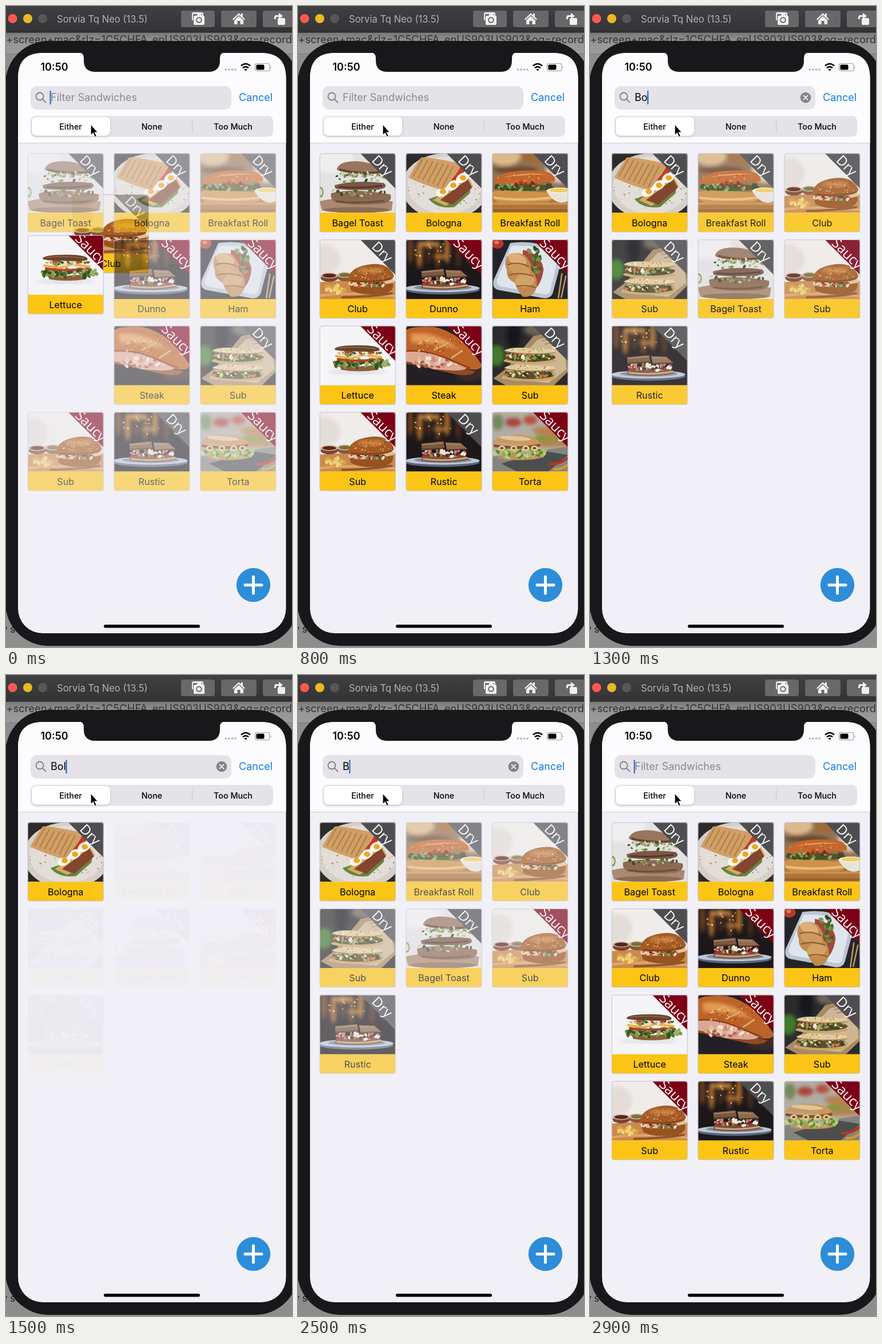
Animation, 500 px wide and 1120 px high, one loop 3 s. Source, as an HTML page:

```html
<!DOCTYPE html>
<html lang="en">
<head>
<meta charset="utf-8">
<title>Sandwich filter</title>
<style>
  html, body { margin: 0; width: 100%; height: 100%; overflow: hidden; background: #8d8d8e; }
  svg { display: block; width: 100%; height: 100%; font-family: Inter, Roboto, sans-serif; }
  .mid { text-anchor: middle; }
  .ribbon { font: 24px "Open Sans", "Noto Sans", sans-serif; fill: #fff; text-anchor: middle; }
  .segment { font-size: 14.3px; font-weight: 500; text-anchor: middle; }
</style>
</head>
<body>
<svg viewBox="0 0 500 1120" preserveAspectRatio="none">
  <defs>
    <linearGradient id="bar" x2="0" y2="1"><stop stop-color="#404043"/><stop offset="1" stop-color="#333336"/></linearGradient>
    <linearGradient id="page" x2="0" y2="1"><stop stop-color="#777778"/><stop offset=".5" stop-color="#979798"/><stop offset="1" stop-color="#9b9b9c"/></linearGradient>
    <clipPath id="cardClip"><rect width="133" height="138" rx="4"/></clipPath>
    <clipPath id="photoClip"><rect width="133" height="104"/></clipPath>
    <filter id="soft"><feGaussianBlur stdDeviation=".7"/></filter>
    <filter id="haze"><feGaussianBlur stdDeviation="3"/></filter>
    <filter id="lift" x="-10%" y="-20%" width="120%" height="150%"><feDropShadow dx="0" dy="2" stdDeviation="2" flood-opacity=".16"/></filter>
  </defs>

  <!-- window behind the phone -->
  <rect width="500" height="1120" fill="#8d8d8e"/>
  <rect y="46" width="500" height="38" fill="url(#page)"/>
  <path d="M0 83.5H500" stroke="#777"/>
  <text x="500" y="65" text-anchor="end" font-size="18.4" fill="#343436">l+screen+mac&amp;rlz=1C5CHFA_enUS903US903&amp;oq=record</text>
  <text x="-7" y="1095" font-size="17" fill="#222">y s</text>
  <rect width="500" height="46" fill="url(#bar)"/>
  <path d="M0 46H500" stroke="#1f1f20"/>
  <circle cx="11.5" cy="22" r="8" fill="#f9584f"/>
  <circle cx="38" cy="22" r="8" fill="#e8b928"/>
  <circle cx="64" cy="22" r="8" fill="#57575a"/>
  <text x="89" y="28.5" font-size="16.6" fill="#b3b3b6">Sorvia Tq Neo (13.5)</text>
  <g fill="#68686b">
    <rect x="306" y="8" width="59" height="29" rx="4"/>
    <rect x="376" y="8" width="62" height="29" rx="4"/>
    <rect x="449" y="8" width="60" height="29" rx="4"/>
  </g>
  <g fill="#f0f0f1">
    <path d="M325 14q0-3 3-3h14q3 0 3 3v3h-2v-3h-16v11h-2z"/>
    <path d="M328 19q0-2 2-2h3l2-3h6l2 3h2q2 0 2 2v12q0 2-2 2h-15q-2 0-2-2z"/>
    <path d="M396 23 407 12.500 411 16v-3h3v6l4 4-1.500 1.500L407 15.800 397.500 24.500z"/>
    <path d="M399 25 407 17.500 415 25v7h-5.500v-6h-5v6H399z"/>
    <rect x="475" y="21" width="13" height="12" rx="2"/>
    <path d="M469 23v-3q0-4 4-4h4v-4l7 5.500-7 5.500v-4h-3q-2 0-2 2v2z"/>
  </g>
  <circle cx="337.500" cy="24.500" r="4.300" fill="none" stroke="#68686b" stroke-width="2"/>

  <!-- phone, centred on x = 255 and running off the right edge -->
  <rect x="-1" y="61" width="512" height="1057" rx="75" fill="#18171a"/>
  <rect x="21" y="82" width="468.500" height="1014" rx="43" fill="#f1f0f7"/>
  <path d="M21 240V125Q21 82 64 82H446.500Q489.500 82 489.500 125V240z" fill="#fcfbfe"/>
  <path d="M21 239.500H489.500" stroke="#cdccd2"/>
  <path d="M126 81Q136 81 136 91V95Q136 115 156 115H354Q374 115 374 95V91Q374 81 384 81z" fill="#18171a"/>
  <text x="60.500" y="113.300" font-size="18" font-weight="600">10:50</text>
  <g fill="#bdbcc2"><circle cx="384.500" cy="111" r="2"/><circle cx="390" cy="111" r="2"/><circle cx="395.500" cy="111" r="2"/><circle cx="401" cy="111" r="2"/></g>
  <g fill="none" stroke="#000" stroke-width="2.600"><path d="M411 104.500q8-7 16 0M414 108.300q5-4.300 10 0"/></g>
  <path d="M416.300 110.700q2.700-2 5.400 0L419 113.500z"/>
  <rect x="435.500" y="100.500" width="25.500" height="13" rx="3.500" fill="none" stroke="#9b9a9f" stroke-width="1.200"/>
  <path d="M462.800 105v4.500q2-2.200 0-4.500" fill="#9b9a9f"/>
  <rect x="437.500" y="102.500" width="14" height="9" rx="1.800"/>

  <!-- search -->
  <rect x="43" y="140" width="351" height="41" rx="11" fill="#e5e3e8"/>
  <g fill="none" stroke="#7f7e84" stroke-width="1.800"><circle cx="59" cy="158" r="6.500"/><path d="M63.700 162.700 69.500 168.500" stroke-linecap="round"/></g>
  <text id="hint" x="78" y="166.300" font-size="18" fill="#8a898f">Filter Sandwiches</text>
  <text id="query" x="78" y="166.300" font-size="18"></text>
  <rect id="caret" y="148" width="2.200" height="24" fill="#2a6cc6"/>
  <g id="clear"><circle cx="377" cy="160" r="9.300" fill="#838287"/><path d="M373.500 156.500l7 7m0-7l-7 7" stroke="#f1f0f4" stroke-width="1.800" stroke-linecap="round"/></g>
  <text x="407" y="166.300" font-size="18" fill="#107adb">Cancel</text>
  <rect x="43" y="192" width="424" height="36.500" rx="9" fill="#e5e3e8"/>
  <rect x="45" y="194" width="137" height="32.500" rx="8" fill="#fff" filter="url(#lift)"/>
  <path d="M325.500 200V220" stroke="#c9c8ce"/>
  <text class="segment" x="113" y="215.500">Either</text>
  <text class="segment" x="255" y="215.500">None</text>
  <text class="segment" x="397" y="215.500">Too Much</text>

  <g id="cards"></g>

  <path d="M148 206.500V226L152.300 222 155.300 229 158.500 227.600 155.500 221H161z" stroke="#fff" stroke-width="1.300"/>
  <circle cx="432.500" cy="1011.700" r="29.600" fill="#2d8dd8"/>
  <path d="M418 1011.700h29M432.500 997.200v29" stroke="#fff" stroke-width="5" stroke-linecap="round"/>
  <rect x="171" y="1081" width="168" height="5.500" rx="2.700"/>
</svg>

<script>
const $ = id => document.getElementById(id);

// Drawing helpers, each returning SVG markup
const oval = (x, y, rx, ry, fill, turn = 0) =>
  `<ellipse cx="${x}" cy="${y}" rx="${rx}" ry="${ry}" fill="${fill}" transform="rotate(${turn} ${x} ${y})"/>`;
const area = (d, fill) => `<path d="${d}" fill="${fill}"/>`;
const line = (d, color, width) =>
  `<path d="${d}" fill="none" stroke="${color}" stroke-width="${width}" stroke-linecap="round"/>`;
const back = fill => `<rect x="-6" y="-6" width="145" height="116" fill="${fill}"/>`;
const hazy = body => `<g filter="url(#haze)">${body}</g>`;

// Random crumbs and leaves inside an ellipse
function bits(n, x, y, rx, ry, size, colors) {
  let seed = n * 31 + x * 7 + y;
  const rnd = () => (seed = (seed * 16807 + 11) % 2147483647) / 2147483647;
  for (let i = 0; i < 5; i++) rnd();
  let out = '';
  for (let i = 0; i < n; i++) {
    const a = rnd() * 6.283, r = Math.sqrt(rnd()), s = size * (.6 + rnd() * .7);
    out += oval((x + Math.cos(a) * r * rx).toFixed(1), (y + Math.sin(a) * r * ry).toFixed(1),
      s.toFixed(1), (s * .6).toFixed(1), colors[i % colors.length], Math.round(rnd() * 180));
  }
  return out;
}

const leaf = ['#4c6b2c', '#7f9a4c', '#34501f', '#a3b070'];

const photos = {
  bagel: () => back('#e4e2e3') + hazy(oval(20, 10, 40, 25, '#efedee')) +
    oval(2, 68, 5, 9, '#7e9a55') + oval(2, 68, 3, 6, '#d5dfbd') +
    area('M0 84Q30 76 65 79T128 84L126 100Q65 110 4 100z', '#a98a70') +
    oval(65, 99, 58, 5, '#8b6c55') +
    area('M20 70Q60 60 124 72 128 84 112 88 64 92 28 86 18 80 20 70', '#8a6a52') +
    line('M30 84Q70 89 112 83', '#6d4f3c', 3) +
    bits(40, 68, 66, 50, 9, 3, [...leaf, '#c9cbaa', '#6b4a38']) +
    area('M26 56Q60 46 112 52 122 60 104 63 60 66 28 62z', '#7b5744') +
    line('M34 59Q70 62 108 57', '#54382c', 3) +
    bits(44, 70, 42, 48, 10, 3, [...leaf, '#d2d3b6', '#b9bd8c']) +
    area('M30 28Q34 14 62 14T110 30Q106 38 68 35T30 28', '#98765e') +
    line('M36 29Q68 37 106 33', '#6b4132', 4) +
    bits(22, 74, 37, 42, 4, 2.5, ['#5d7a37', '#87a256', '#dadcc2']),

  bologna: () => back('#2d2a29') + oval(69, 58, 76, 58, '#d4cfc8') + oval(69, 56, 66, 50, '#e2ddd6') +
    bits(44, 68, 62, 64, 40, 1.2, ['#8b5f4a', '#b0968a']) +
    area('M40 80Q55 98 85 94L112 70 114 50 70 70z', '#66853f') +
    area('M48 82 70 92 118 58 108 40z', '#d9ab60') + area('M60 82 82 90 116 60 108 45z', '#84452f') +
    line('M66 62Q88 50 100 25', '#c43a24', 10) + line('M70 67Q92 55 106 38', '#d9573c', 4) +
    [[64, 67], [82, 56], [99, 43]].map(([x, y]) =>
      oval(x, y, 12, 8, '#fbf9f3', -30) + oval(x + 1, y, 5.5, 4.5, '#f1a51f')).join('') +
    area('M5 43Q6 38 26 8 30 4 95 18 100 22 68 62 62 68 5 43', '#cf9f66') +
    [0, 1, 2, 3, 4, 5, 6].map(i =>
      line(`M${29 + i * 9} ${11 + i * 2}L${13 + i * 8.5} ${40 + i * 3.2}`, '#b07c48', 2)).join(''),

  breakfast: () => back('#8f7357') + hazy(oval(22, 6, 28, 16, '#dcb98a') + oval(72, 4, 22, 15, '#a06a38') +
    oval(116, 30, 22, 22, '#d9cbb8') + oval(40, 29, 40, 6, '#6b4a2f')) +
    area('M0 76H133V104H0z', '#b0743a') + line('M-2 88H135', '#cb924f', 4) + line('M-2 100H135', '#95602e', 4) +
    area('M0 68Q10 62 60 66T108 68Q112 82 96 85L12 86Q0 82 0 68', '#cf9248') +
    line('M4 78Q50 84 102 78', '#e8bd7d', 4) + oval(56, 60, 52, 6, '#3f5a22') +
    bits(46, 55, 58, 52, 7, 3.5, [...leaf, '#a92e22', '#2f4a1c']) +
    area('M3 54Q0 44 20 36T90 31Q112 36 110 49 60 52 3 54', '#c4672c') +
    area('M20 42Q55 32 98 37 56 38 20 42', '#e2975a') + bits(22, 56, 43, 46, 6, 1.2, ['#efc48d', '#984717']) +
    bits(10, 70, 54, 38, 3, 4, ['#c22d20', '#742c23']) +
    area('M94 65H139V80Q114 98 94 65', '#e8e4dc') + oval(117, 65, 21, 5, '#f4f1ea') + oval(117, 65, 17, 3.500, '#f1ce58'),

  club: () => back('#f0ece9') + hazy(oval(8, 35, 28, 26, '#e4dcd7')) +
    area('M-5 75Q65 68 138 73V110H-5z', '#cb8a4d') + line('M0 98Q60 91 133 99', '#dfa669', 4) +
    line('M40 101Q90 100 126 94', '#8d5529', 4) +
    oval(17, 67, 15, 7, '#7c4430') + oval(17, 63, 15, 5, '#c8b19b') + oval(17, 63, 12, 3.500, '#5d2418') +
    oval(44, 66, 13, 7, '#8b5738') + oval(44, 62, 13, 5, '#cbb89e') + oval(44, 62, 10, 3.500, '#77703a') +
    oval(29, 88, 18, 6, '#d7a94e') + bits(22, 28, 86, 18, 8, 4, ['#efcc73', '#d8a043', '#f3da92']) +
    area('M52 78Q80 86 128 75 132 90 112 95 72 99 55 89z', '#97531f') +
    line('M54 77Q82 83 127 72', '#dfc39b', 7) +
    bits(34, 88, 77, 36, 5, 3.5, ['#8c2c22', '#c6543c', '#6d8238', '#e9dbc3', '#5a2a18']) +
    area('M50 73Q49 50 84 44T130 63Q130 74 92 75T50 73', '#a45a22') +
    hazy(oval(90, 54, 24, 5, '#cf8744')) + line('M56 72Q92 76 126 68', '#7c3f16', 2) +
    bits(46, 91, 60, 33, 11, 1.2, ['#dba76d', '#7a3c14', '#e9c08a']),

  dunno: () => back('#1c181a') + hazy([8, 24, 40, 56, 72, 92, 112].map((x, i) =>
      oval(x, 18 + i % 2 * 8, 5, 24, ['#6b3f22', '#a8682c', '#472c1c'][i % 3])).join('') +
      oval(40, 8, 20, 4, '#c98d45') + oval(62, 30, 14, 3, '#b9793a')) +
    bits(16, 52, 24, 48, 18, 1.8, ['#f0b85e', '#d98e3c', '#ffe0a0']) +
    oval(64, 88, 65, 8, '#59667a') + oval(64, 85, 65, 7, '#bcc6d5') + oval(65, 84, 50, 5, '#7f8a9c') +
    area('M29 76 103 74 110 83Q70 91 27 85z', '#7a4e36') + line('M31 82Q68 87 107 80', '#c9a67e', 3) +
    bits(50, 67, 72, 40, 7, 3.5, ['#efe4d5', '#ad2d35', '#8a9949', '#d47b79', '#f5eee1', '#5b2a26']) +
    area('M27 55 66 51 68 64 28 67z', '#7a5840') + area('M69 53 96 54 108 65 72 67z', '#8f6b4e') +
    line('M29 57 64 54M72 56 94 57', '#a5835f', 2) + line('M29 65 67 63M73 66 105 65', '#54392a', 2),

  ham: () => back('#242428') + oval(9, 7, 11, 9, '#b8392a') + oval(8, 5, 4, 3, '#e47a57') +
    area('M32 6Q74 0 112 18 125 23 121 38L106 94Q101 105 87 102L10 88Q-1 84 3 70z', '#bcc5d1') +
    area('M34 11Q73 8 110 23 117 26 114 37L101 92Q96 98 87 95L15 82Q6 79 9 69z', '#dfe5ec') +
    area('M54 18Q86 25 90 52 86 84 66 92L52 65z', '#a3483a') +
    bits(40, 70, 40, 16, 26, 4, ['#40652c', '#6a8c3d', '#2b4820', '#7d9950']) +
    area('M26 30Q40 18 58 28 70 40 68 54 80 62 78 82 74 102 54 100 44 90 40 76 24 68 26 54 20 42 26 30', '#c08a52') +
    oval(44, 35, 17, 10, '#dcae78', 24) + oval(48, 52, 20, 10, '#cd9a60', 18) + oval(57, 72, 17, 11, '#d3a267', -8) +
    line('M28 44Q44 38 64 47M30 62Q48 56 72 64M44 82Q58 78 76 84', '#8d5a2c', 2) +
    line('M122 60 116 102M129 64 121 101', '#b99a60', 2.5),

  lettuce: () => back('#f5f5f8') + hazy(oval(66, 81, 52, 4, '#dcdfe6')) +
    area('M34 68Q64 74 106 67L102 77Q68 82 38 77z', '#8d6136') +
    bits(60, 70, 66, 50, 8, 4.5, leaf) + line('M32 58Q62 64 107 58', '#b8402c', 4) +
    line('M29 53 56 57 76 51 108 55', '#eab03c', 4) + line('M32 48Q70 53 105 48', '#e6b2a0', 3) +
    bits(30, 66, 48, 43, 4, 3.5, [...leaf, '#c94430', '#f0ddc0']) +
    area('M26 41Q29 34 67 34T105 42Q105 46 66 45T26 41', '#67432a') +
    line('M33 39Q65 35 98 40', '#8d6241', 2) + bits(20, 103, 68, 18, 8, 4.5, leaf),

  steak: () => back('#241f24') + hazy(oval(112, 84, 26, 12, '#3d2c2b')) +
    area('M0 54 40 58 90 72 122 80Q112 90 84 84L40 74 0 66z', '#8f4c22') +
    area('M0 42 40 44 112 70Q104 80 80 78L48 76 30 68 0 62z', '#dca896') +
    bits(40, 52, 63, 46, 10, 4, ['#f0ccb9', '#cf8a78', '#f7e4d4', '#a8604f', '#e7bba8']) +
    area('M0 8Q10 0 50 2 84 10 106 34T133 70Q128 80 108 75L62 54Q30 42 0 46z', '#bd6228') +
    hazy(area('M8 14Q54 8 98 44 56 28 10 30z', '#e39b54')) +
    line('M22 32 48 20M50 42 74 30M80 56 98 44', '#dfa762', 3) + line('M0 44Q34 42 64 54T112 74', '#7f3c17', 2) +
    bits(40, 61, 34, 50, 18, 1.4, ['#f0bf7e', '#8a411b']),

  panini: () => back('#2b2b2b') + hazy(oval(38, 17, 12, 24, '#12151b') + oval(8, 52, 14, 18, '#3f7a2c') +
      oval(80, 6, 24, 12, '#6b6255')) + area('M72 18 128 6 133 80 108 104H24L2 92 26 74z', '#a78a66') +
    area('M80 24 124 14 130 76 99 100 16 92z', '#cfb693') +
    line('M88 26 120 20M92 32 124 26', '#8d8274', 1.500) +
    [39, 69].map(y => oval(66, y + 22, 46, 6, '#c9a76c') + oval(66, y + 16, 45, 8, '#5b4a2c') +
      bits(50, 66, y + 15, 45, 7, 3.5, [...leaf, '#c7773f', '#e8d7ac', '#f0e8d2', '#4a3420']) +
      area(`M21 ${y + 5}Q28 ${y - 3} 67 ${y}T108 ${y + 1}L111 ${y + 8}Q62 ${y + 13} 21 ${y + 5}`, '#e0cb9c') +
      line(`M24 ${y + 7}Q66 ${y + 13} 110 ${y + 8}`, '#a47c46', 1.500) +
      bits(22, 65, y + 4, 40, 3, 1.5, ['#b58a4b', '#f4e8c8'])).join(''),

  torta: () => back('#b1ada5') + hazy(oval(37, 18, 14, 8, '#a8443a') + oval(67, 14, 12, 8, '#b8503c') +
      oval(10, 18, 10, 14, '#73885a')) + area('M0 78 80 68 133 60V104H0z', '#84847f') +
    area('M16 90 90 68 133 75 98 104H43z', '#4c4e4e') +
    hazy(oval(104, 47, 32, 8, '#7f9745') + oval(104, 36, 34, 9, '#b78250', 8) + oval(104, 56, 30, 5, '#b78250')) +
    oval(48, 79, 38, 5, '#c1915c') +
    bits(56, 47, 71, 46, 9, 4.5, ['#8fab48', '#c3cc86', '#5f832f', '#a9bf62']) +
    line('M5 59Q42 66 82 58', '#8f4a2c', 5) +
    [17, 38, 59, 74].map(x => oval(x, 63, 6, 4.500, '#ecd092') + oval(x, 63, 3, 2, '#7f492a')).join('') +
    area('M2 55Q2 43 36 40T85 54Q75 60 42 57T2 55', '#c9995f') + oval(40, 46, 28, 4, '#e2c49c', 4) +
    line('M102 91Q117 92 131 81', '#b8351f', 5) + line('M109 100Q121 101 132 92', '#d99a2a', 4)
};

const menu = [
  ['Bagel Toast', 'bagel'], ['Bologna', 'bologna'], ['Breakfast Roll', 'breakfast'],
  ['Club', 'club'], ['Dunno', 'dunno', true], ['Ham', 'ham', true],
  ['Lettuce', 'lettuce', true], ['Steak', 'steak', true], ['Sub', 'panini'],
  ['Sub', 'club', true], ['Rustic', 'dunno'], ['Torta', 'torta', true]
];

const layer = $('cards');
const cards = menu.map(([name, photo, saucy]) => {
  const g = document.createElementNS('http://www.w3.org/2000/svg', 'g');
  g.innerHTML = `<g clip-path="url(#cardClip)">
    <g clip-path="url(#photoClip)"><g filter="url(#soft)">${photos[photo]()}</g>
      <path d="M71 0H133V62z" fill="${saucy ? '#7c0016' : '#4e4e50'}"/>
      <text class="ribbon" transform="translate(${saucy ? '110 25' : '109 22'}) rotate(45)" y="7.500">${saucy ? 'Saucy' : 'Dry'}</text></g>
    <rect y="104" width="133" height="34" fill="#fcc415"/></g>
    <text class="mid" x="66.500" y="127.300" font-size="16.200">${name}</text>
    <rect x=".5" y=".5" width="132" height="137" rx="4" fill="none" stroke="#c4c3cb"/>`;
  return layer.appendChild(g);
});

// Each stage: start time, cards by slot, stacking order from the bottom
const all = menu.map((_, i) => i);
const withB = [1, 2, 3, 8, 0, 9, 10];
const stages = [
  [-999, [6, 3], all],
  [-145, all, [3, 6, 0, 1, 2, 4, 5, 7, 8, 9, 10, 11]],
  [968, withB, [3, 0, 1, 2, 5, 4, 7, 8, 9, 10, 6, 11]],
  [1230, [1], all],
  [2330, withB, all],
  [2588, all, [1, 2, 3, 8, 0, 9, 10, 4, 5, 6, 7, 11]]
];
const typing = [[0, ''], [1000, 'B'], [1300, 'Bo'], [1400, 'Bol'], [2300, 'Bo'], [2400, 'B'], [2600, '']];
const caretOff = [[600, 900], [2000, 2300]];

const slotX = s => 37.7 + s % 3 * 150.8;
const slotY = s => 257.3 + Math.floor(s / 3) * 150.7;
const mix = (a, b, p) => a + (b - a) * p;
const ease = x => { x = Math.min(1, Math.max(0, x)); return x * x * (3 - 2 * x); };
let shownStage = -1;

function drawCards(t) {
  const n = stages.findLastIndex(s => s[0] <= t);
  const [start, now, order] = stages[n], before = stages[n - 1][1];
  const p = ease((t - start) / 300);
  if (n !== shownStage) order.forEach(i => layer.append(cards[i]));
  shownStage = n;
  cards.forEach((card, i) => {
    const a = before.indexOf(i), b = now.indexOf(i);
    const from = a < 0 ? b : a, to = b < 0 ? a : b;
    const fadeIn = p ** .8;
    const alpha = a < 0 ? (b < 0 ? 0 : fadeIn) : (b < 0 ? 1 - p : 1);
    card.style.display = alpha ? '' : 'none';
    card.setAttribute('opacity', alpha);
    card.setAttribute('transform',
      `translate(${mix(slotX(from), slotX(to), p)} ${mix(slotY(from), slotY(to), p)})`);
  });
}

function drawSearch(t) {
  const text = typing.findLast(s => s[0] <= t)[1];
  $('query').textContent = text;
  $('hint').style.display = text ? 'none' : '';
  $('clear').style.display = text ? '' : 'none';
  $('caret').setAttribute('x', text ? 77.5 + $('query').getComputedTextLength() : 76.5);
  $('caret').style.display = caretOff.some(([a, b]) => t >= a && t < b) ? 'none' : '';
}

const begin = performance.now();
let last = -1;
function tick() {
  const t = Math.floor((performance.now() - begin + 8) / 100) * 100 % 3000;
  if (t !== last) { drawCards(t); drawSearch(t); last = t; }
  requestAnimationFrame(tick);
}
tick();
</script>
</body>
</html>
```
